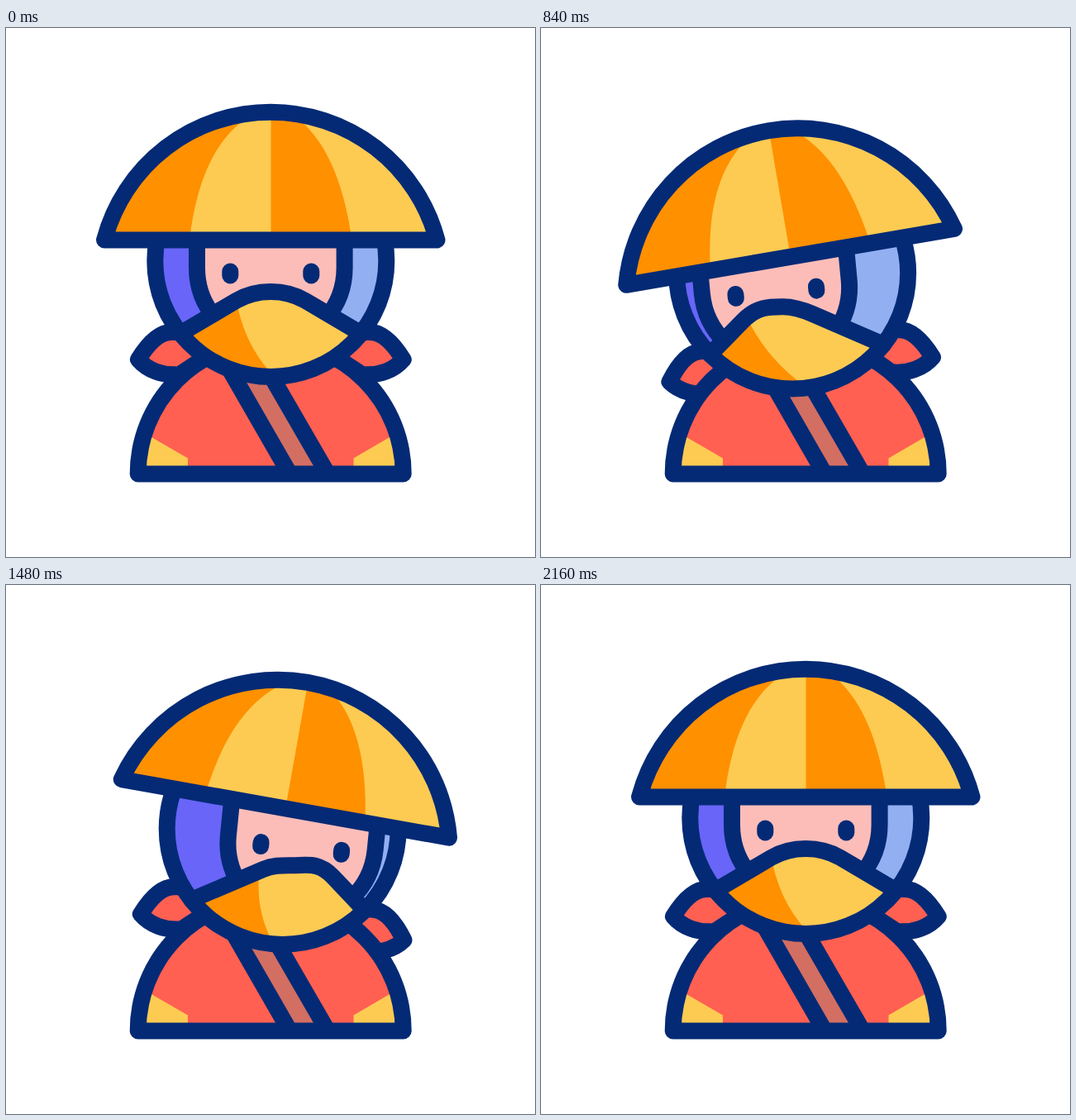
These frames come from a looping animation (640x640 px, 2.2 s). An HTML page:

```html
<!DOCTYPE html>
<html lang="en">
<head>
<meta charset="utf-8">
<title>Straw hat warrior</title>
<style>
  html, body { margin: 0; width: 100%; height: 100%; overflow: hidden; background: #fff; }
  svg { display: block; width: 100%; height: 100%; }
  .line { fill: none; stroke: #042a75; stroke-width: 20; stroke-linecap: round; stroke-linejoin: round; }
  .navy { fill: #042a75; }
  .red { fill: #ff6052; }
  .pink { fill: #fcbdb9; }
  .orange { fill: #ff9000; }
  .yellow { fill: #fdcb52; }
</style>
</head>
<body>
<svg viewBox="0 0 640 640">
  <defs>
    <path id="knot" class="line red" d="M225 368H200C182 368 168 388 160 401C171 414 189 421 210 419L245 396"/>
    <path id="body" d="M159.700 539.500A160.500 160.500 0 0 1 480.700 539.500Z"/>
    <path id="dome" d="M119 256.500A208.200 208.200 0 0 1 521.500 256.500Z"/>
    <clipPath id="bodyClip"><use href="#body"/></clipPath>
    <clipPath id="domeClip"><use href="#dome"/></clipPath>
    <clipPath id="headClip"><circle r="140"/></clipPath>
    <clipPath id="maskClip"><path id="maskShape"/></clipPath>
  </defs>

  <use id="knotLeft" href="#knot"/>
  <use id="knotRight" href="#knot"/>

  <g clip-path="url(#bodyClip)">
    <rect class="red" x="150" y="370" width="340" height="180"/>
    <path class="yellow" d="M150 480L220 520.500V545H150ZM490 480L420.500 520.500V545H490Z"/>
    <path fill="#d36e62" d="M263 400L338 530H384L309 400Z"/>
    <path class="line" d="M263 400L343.500 540M308.500 400L389.500 540"/>
  </g>
  <use href="#body" class="line"/>

  <g id="head">
    <g clip-path="url(#headClip)">
      <rect fill="#6865f8" x="-150" y="-150" width="300" height="300"/>
      <rect id="lightSide" fill="#92aff1" y="-150" width="200" height="300"/>
      <g id="face">
        <path class="line pink" d="M-89.300 -97V-7C-89.300 16 -82 37 -66 55H66C82 37 89.300 16 89.300 -7V-97"/>
        <rect class="navy" x="-59" y="-12.500" width="20" height="25" rx="10"/>
        <rect class="navy" x="39" y="-12.500" width="20" height="25" rx="10"/>
      </g>
      <g clip-path="url(#maskClip)">
        <rect class="yellow" x="-150" width="300" height="150"/>
        <path id="maskShade" class="orange"/>
      </g>
    </g>
    <path id="maskEdge" class="line"/>
    <circle class="line" r="140"/>
  </g>

  <g id="hat">
    <g clip-path="url(#domeClip)">
      <rect class="yellow" x="100" y="80" width="440" height="190"/>
      <path class="orange" d="M100 90H310L287 112C250 140 230 190 222 257H100Z"/>
      <path class="orange" d="M320.500 90H330L356 112C389 140 409 190 418.500 257H320.500Z"/>
    </g>
    <use href="#dome" class="line"/>
  </g>
</svg>
<script>
const LOOP = 2200, STEP = 40, MIDDLE = 320.3;
const $ = id => document.getElementById(id);
const set = (id, name, value) => $(id).setAttribute(name, value);

const smooth = (t, from, to) => {
  const u = Math.min(1, Math.max(0, (t - from) / (to - from)));
  return u * u * (3 - 2 * u);
};

// Front, then left (-1), then right (+1), then front.
const turnHead = t => 2 * smooth(t, 772, 1276) - smooth(t, 150, 500) - smooth(t, 1413, 1906);
const turnHat = t => 2 * smooth(t, 790, 1326) - smooth(t, 160, 536) - smooth(t, 1450, 1960);
const lower = t => smooth(t, 150, 460) - smooth(t, 1450, 1906);

// One slope of the mask, from the rim of the head to the peak; side is -1 or 1.
function maskSlope(side, turn, down, peak) {
  const toward = side * turn;
  const angle = (38.7 + 2.7 * down + 3.6 * toward) * Math.PI / 180;
  const rim = [side * 140 * Math.cos(angle), 140 * Math.sin(angle)];
  const knee = [side * 42 + 19.5 * turn, 48 + 5.5 * down + 4.5 * toward];
  const reach = 0.35 * (peak[0] - knee[0]);
  const slope = (knee[1] - rim[1]) / (knee[0] - rim[0]);
  return {
    rim, knee,
    kneeHandle: [knee[0] + reach, knee[1] + reach * slope],
    peakHandle: [peak[0] - reach, peak[1]]
  };
}

function drawMask(turn, down) {
  const peak = [12.5 * turn, 37 + 5.5 * down + 2 * turn];
  const a = maskSlope(-1, turn, down, peak), b = maskSlope(1, turn, down, peak);
  const edge = `M${a.rim}L${a.knee}C${a.kneeHandle} ${a.peakHandle} ${peak}` +
    `C${b.peakHandle} ${b.kneeHandle} ${b.knee}L${b.rim}`;
  set('maskEdge', 'd', edge);
  set('maskShape', 'd', `${edge}V150H${a.rim[0]}Z`);
  set('maskShade', 'd', `M${16 * turn - 43} ${40 + 7 * down - 2 * turn}` +
    `Q-34 ${98 - 3 * turn} ${-14 * turn} 135V150H-150V0Z`);
}

// The knot on the side the head turns to drops and tilts.
function knotPose(toward) {
  const near = Math.max(0, toward), far = Math.max(0, -toward);
  return `translate(${3 * far - 5 * near} ${30 * near - 3 * far}) rotate(${-6 * near} 160 401)`;
}

function draw(t) {
  const turn = turnHead(t), down = lower(t);
  const faceX = 22.8 * turn + 0.8 * down;
  const faceY = 15 + down * (4.2 + 5 * turn * turn);

  set('knotLeft', 'transform', knotPose(-turn));
  set('knotRight', 'transform', `translate(${2 * MIDDLE - 4 * down}) scale(-1 1) ${knotPose(turn)}`);

  set('head', 'transform',
    `translate(${MIDDLE + 16.5 * turn - 1.3 * down} ${282 + down * (13.8 - 0.8 * turn)})`);
  set('face', 'transform', `translate(${faceX} ${faceY}) rotate(${6 * turn})`);
  set('lightSide', 'x', faceX);
  drawMask(turn, down);

  set('hat', 'transform',
    `translate(${19.5 * turn - down} ${down * (17.3 - 3.4 * turn)}) rotate(${10.2 * turnHat(t)} ${MIDDLE} 257)`);
}

function tick() {
  const t = performance.now() % LOOP;
  draw(Math.floor(t / STEP) * STEP);
  requestAnimationFrame(tick);
}
tick();
</script>
</body>
</html>
```
